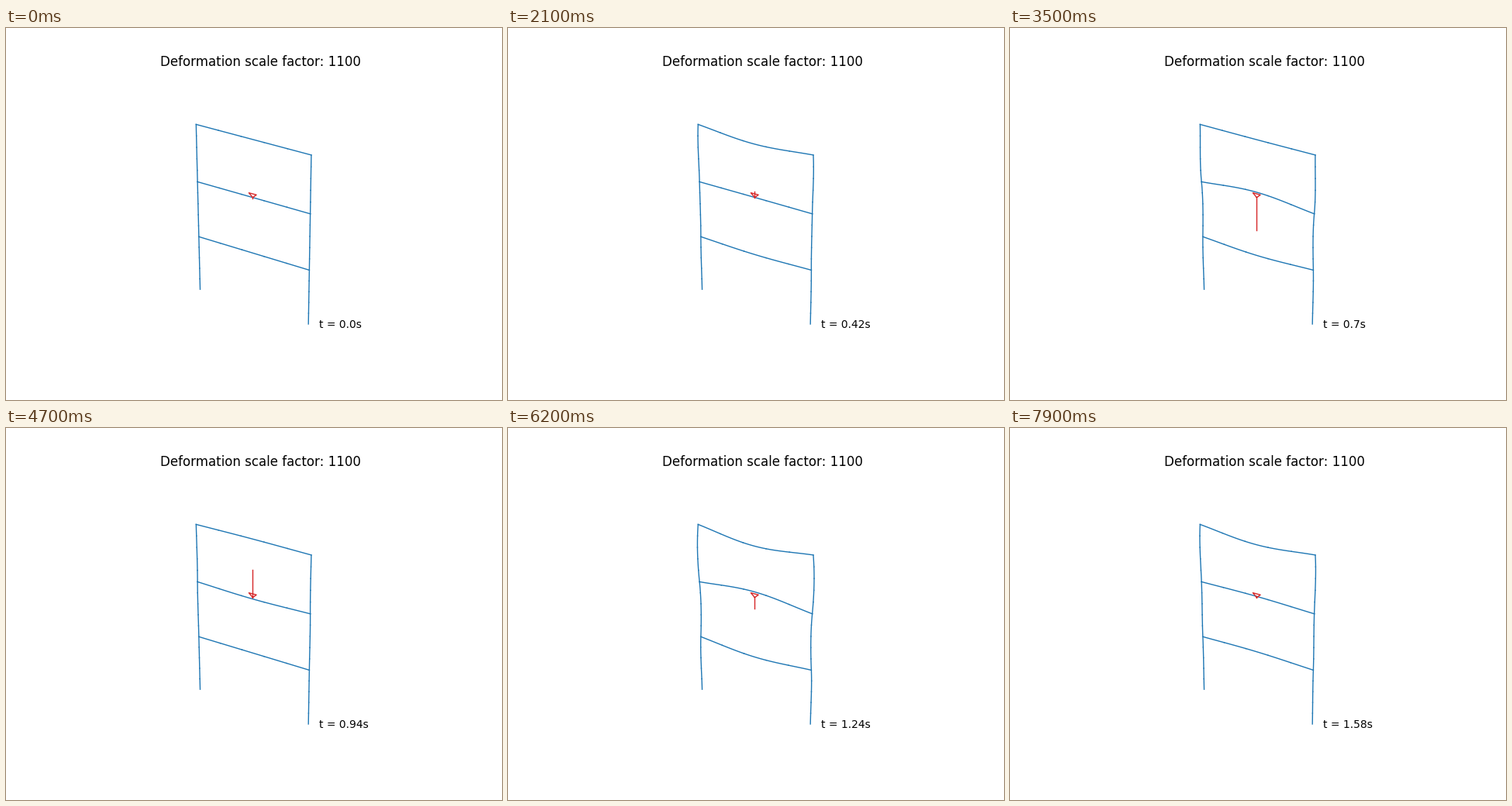
A matplotlib script for the animation above (8000 ms loop, 640 by 480 pixels).

```python
import numpy as np
import matplotlib.pyplot as plt
from matplotlib.animation import FuncAnimation
from matplotlib.collections import LineCollection

W, H, DPI = 640, 480, 100
FRAMES, INTERVAL, DT = 80, 100, 0.02
BLUE, RED = "tab:blue", "tab:red"

STOREYS, PIECES, STEPS = 3, 5, 8
U = np.linspace(0, 1, PIECES * STEPS + 1)
STIFFNESS = 0.3  # share of the clamped shape in a bent beam
JOINT_SLOPE = 0.011  # column slope per pixel of beam sag


def between(a, b, u, depth):
    """Point at share u of the edge a-b, foreshortened by depth."""
    p = u * depth / (u * depth + 1 - u)
    return np.asarray(a) + np.multiply.outer(p, np.subtract(b, a))


def joints(base, top):
    return between(base, top, np.linspace(0, 1, STOREYS + 1), 0.937)


def across(a, b, u):
    return between(a, b, u, 0.96)


LEFT = joints((250.5, 337.2), (245.3, 124.4))
RIGHT = joints((390.2, 382.0), (393.9, 163.9))
TIP = across(LEFT[2], RIGHT[2], 0.5)


def sags(t):
    """Midspan sag of the beams in pixels, from the lowest to the top one."""
    ramp = 1 - np.exp(-(t / 0.25) ** 2)
    slow_ramp = 1 - np.exp(-(t / 0.5) ** 2)
    low = ramp * (2.2 + 2.4 * t * np.cos(9.6 * (t - 1.25)))
    mid = -2.6 * ramp - 4.8 * slow_ramp * np.cos(12.2 * (t - 0.7))
    top = 4 * t + 4.9 * ramp * np.sin(6.4 * t - 0.8)
    return np.array([low, mid, top])


def load(t):
    """Signed arrow length: a burst of oscillation with an early ripple."""
    burst = 44 * np.exp(-((t - 0.8) / 0.45) ** 2) * np.cos(10 * (t - 0.67))
    ripple = 10 * np.exp(-((t - 0.42) / 0.25) ** 2) * np.cos(20 * (t - 0.42))
    return burst + ripple


def beam(a, b, sag):
    pts = across(a, b, U)
    arch = np.sin(np.pi * U)
    pts[:, 1] += sag * ((1 - STIFFNESS) * arch + STIFFNESS * arch ** 2)
    return pts


def storey(a, b, slope_a, slope_b):
    pts = a + U[:, None] * (b - a)
    bend = U * (1 - U) ** 2 * slope_a - U ** 2 * (1 - U) * slope_b
    pts[:, 0] += (b - a)[1] * bend
    return pts


def split(pts):
    return [pts[i:i + STEPS + 1] for i in range(0, len(pts) - 1, STEPS)]


def frame_pieces(t):
    sag = sags(t)
    shapes = [beam(a, b, s) for a, b, s in zip(LEFT[1:], RIGHT[1:], sag)]
    slope = JOINT_SLOPE * np.append(0, sag)
    for column, side in ((LEFT, -1), (RIGHT, 1)):
        for k in range(STOREYS):
            shapes.append(storey(column[k], column[k + 1],
                                 side * slope[k], side * slope[k + 1]))
    return [piece for pts in shapes for piece in split(pts)]


fig = plt.figure(figsize=(W / DPI, H / DPI), dpi=DPI, facecolor="white")
ax = fig.add_axes([0, 0, 1, 1])
ax.set_xlim(0, W)
ax.set_ylim(H, 0)
ax.axis("off")

ax.text(328, 49.3, "Deformation scale factor: 1100", fontsize=12,
        ha="center", va="baseline")
clock = ax.text(404, 387, "", fontsize=10, va="baseline")
structure = LineCollection([], colors=BLUE, linewidths=1,
                           capstyle="projecting", zorder=1)
ax.add_collection(structure, autolim=False)
shaft, = ax.plot([], [], color=RED, lw=1)
head = TIP + np.array([(0, 0), (-5, -6), (4.7, -3.4), (0, 0)])
ax.plot(*head.T, color=RED, lw=1)


def update(i):
    t = i * DT
    structure.set_segments(frame_pieces(t))
    shaft.set_data([TIP[0]] * 2, [TIP[1], TIP[1] + load(t)])
    clock.set_text(f"t = {round(t, 2)}s")
    return structure, shaft, clock


anim = FuncAnimation(fig, update, frames=FRAMES, interval=INTERVAL,
                     repeat=True, repeat_delay=0, blit=False)
plt.show()
```
